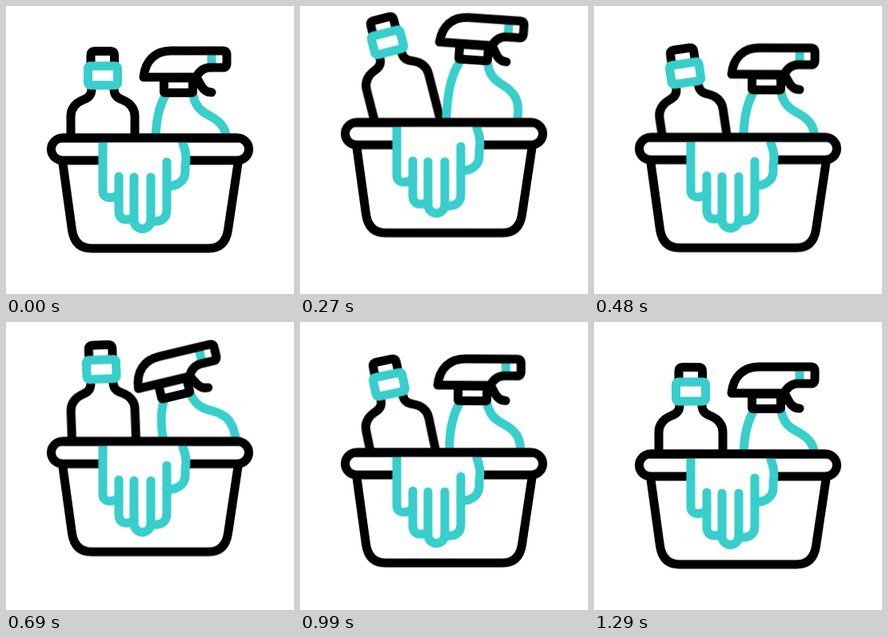
These frames come from a looping animation (360x360 px, 1800 ms). An HTML page:

```html
<!DOCTYPE html>
<html lang="en">
<head>
<meta charset="utf-8">
<title>Cleaning basket</title>
<style>
  :root {
    --sine: cubic-bezier(.37, 0, .63, 1);
    --fall: cubic-bezier(.333, 0, .667, .333);
  }
  html, body { margin: 0; width: 100%; height: 100%; overflow: hidden; background: #fff; }
  svg { display: block; width: 100%; height: 100%; }
  path, rect { fill: none; stroke: #000; stroke-width: 11; stroke-linecap: round; stroke-linejoin: round; }
  .teal { stroke: #37cecc; }
  .flat { stroke-linecap: butt; }
  .white { fill: #fff; }
  .blank { fill: #fff; stroke: none; }

  .hop, .lift, .tilt { animation: 1800ms linear infinite; }
  .hop { animation-name: hop; }
  .bottle .lift { animation-name: bottle-lift; }
  .bottle .tilt { animation-name: bottle-tilt; transform-origin: 121px 134px; }
  .spray .lift { animation-name: spray-lift; }
  .spray .tilt { animation-name: spray-tilt; transform-origin: 216px 122px; }

  /* Two 540 ms hops (30% each), then a rest. */
  @keyframes hop {
    0%, 30%, 60%, 100% { transform: translateY(0); animation-timing-function: var(--sine); }
    16.667%, 46.667% { transform: translateY(-19.5px); animation-timing-function: var(--fall); }
  }
  @keyframes bottle-lift {
    0%, 3.333%, 30%, 33.333%, 60%, 100% { transform: translateY(0); animation-timing-function: var(--sine); }
    21.667%, 51.667% { transform: translateY(-26px); animation-timing-function: var(--fall); }
  }
  @keyframes bottle-tilt {
    0%, 6.667%, 30%, 36.667%, 60%, 100% { transform: rotate(0deg); animation-timing-function: var(--sine); }
    20.833%, 50.833% { transform: rotate(-16.3deg); animation-timing-function: ease-in; }
  }
  @keyframes spray-lift {
    0%, 7.5%, 30%, 37.5%, 60%, 100% { transform: translateY(0); animation-timing-function: var(--sine); }
    21.667%, 51.667% { transform: translateY(-26px); animation-timing-function: var(--fall); }
  }
  @keyframes spray-tilt {
    0%, 30%, 60%, 100% { transform: rotate(0deg); animation-timing-function: var(--sine); }
    8.333%, 38.333% { transform: rotate(-13.5deg); animation-timing-function: var(--sine); }
    15.833%, 45.833% { transform: rotate(4deg); animation-timing-function: var(--sine); }
  }
</style>
</head>
<body>
<svg viewBox="0 0 360 360">
  <g class="hop">
    <g class="bottle"><g class="lift"><g class="tilt">
      <path d="M106 72V61q0-4.500 4.500-4.500h20.500q4.500 0 4.500 4.500V72"/>
      <path d="M107 104C107 111 103 115 97 117C87 121 81 127 81 138V192M135 104C135 111 139 115 145 117C155 121 161 127 161 138V192"/>
      <rect class="teal white" x="102.500" y="75" width="37" height="24" rx="3"/>
    </g></g></g>

    <g class="spray"><g class="lift"><g class="tilt">
      <path class="teal" d="M199 112C190 128 187 146 187 170V196M234 112C237 126 244 132 256 138C270 146 276 154 276 172V196"/>
      <path class="teal flat" d="M257 58V76"/>
      <path d="M172 89C174 68 187 56 206 56H271q5 0 5 5V72q0 5-5 5H254Q243 78 238 89Z"/>
      <path d="M238 89L243 98Q248 108 257 108"/>
      <rect class="white" x="197.500" y="90" width="36" height="18.500" rx="1"/>
    </g></g></g>

    <path class="white" d="M70.500 193L82.500 280Q86 303 107 303H253Q274 303 277.500 280L290.500 193"/>
    <rect class="white" x="56.500" y="165" width="247" height="28" rx="14"/>

    <path class="blank" d="M121 170V232q0 9 9 9h11V256q0 13 19 13q0 10 10.500 10t10.500-10q20 0 20-13V228q23-2 23-20Q227 186 221 170Z"/>
    <g class="teal-lines">
      <path class="teal" d="M121 172V231q0 8.500 9 8.500q8 0 11-5.500"/>
      <path class="teal" d="M141 213V256q0 11 10 11q6 0 9-3"/>
      <path class="teal" d="M160 214V268a10.500 10.500 0 0 0 21 0V214"/>
      <path class="teal" d="M181 269Q201 271 201 255V195"/>
      <path class="teal" d="M201 225C212 226 224 220 224 207V200Q227 186 221 172"/>
    </g>
    <path d="M71 165H289"/>
  </g>
</svg>
</body>
</html>
```
